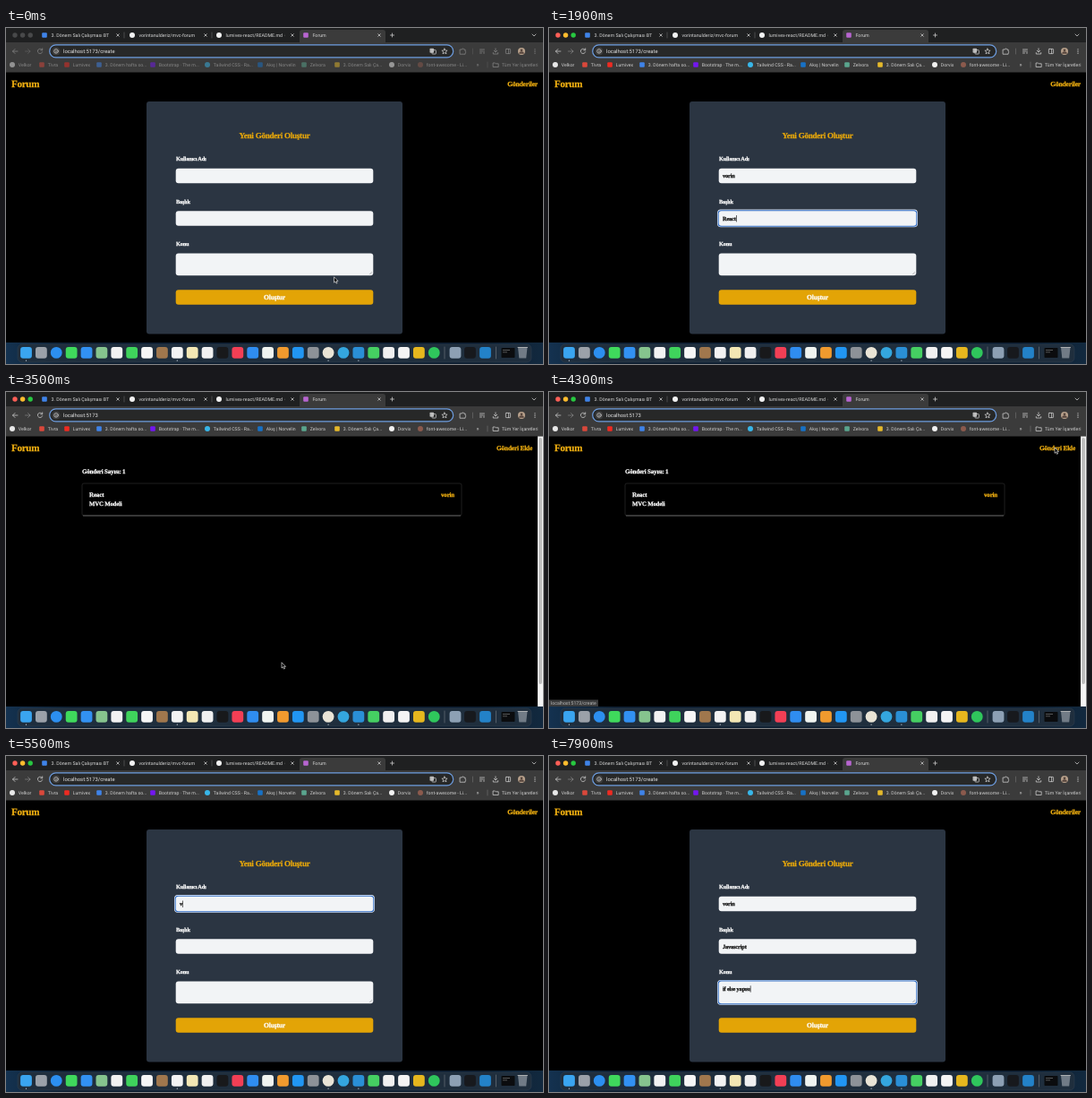
Recreate the animation shown at these times as an HTML page. Size 600 by 375 pixels, loop 8 s.

```html
<!DOCTYPE html>
<html lang="tr">
<head>
<meta charset="utf-8">
<title>Forum</title>
<style>
  html, body { margin: 0; width: 100%; height: 100%; overflow: hidden; background: #000; }
  svg { display: block; width: 100vw; height: 100vh; }
  text { white-space: pre; text-rendering: geometricPrecision; }
  .ui { font-family: Roboto, "Liberation Sans", sans-serif; }
  .page text {
    font-family: "Liberation Serif", "Noto Serif", serif; font-weight: 700; letter-spacing: -.028em;
    fill: currentColor; stroke: currentColor; stroke-width: .25px;
  }
  .line { fill: none; stroke: #c7c7c7; stroke-width: .8; stroke-linecap: round; stroke-linejoin: round; }
  /* window in the background */
  .idle .tools { opacity: .5; }
  .idle .lights circle { fill: #48494a; }
</style>
</head>
<body>
<svg id="stage" viewBox="0 0 600 375">
  <defs>
    <linearGradient id="desk" x2="1">
      <stop stop-color="#143250"/><stop offset=".12" stop-color="#0c1d2f"/>
      <stop offset=".88" stop-color="#0c1d2f"/><stop offset="1" stop-color="#12293f"/>
    </linearGradient>
  </defs>
  <rect width="600" height="375"/>
  <g id="browser" class="ui"></g>

  <g id="create" class="page">
    <text x="6" y="66.3" font-size="11.1" color="#f2b111">Forum</text>
    <text x="594" y="65" font-size="7.6" color="#f2b111" text-anchor="end">Gönderiler</text>
    <rect x="157" y="82" width="286" height="259.5" rx="3" fill="#2b3542"/>
    <text x="300" y="123.3" font-size="9.05" color="#eaa90a" text-anchor="middle">Yeni Gönderi Oluştur</text>
    <g id="form"></g>
    <rect x="189.7" y="292.2" width="220.6" height="16.5" rx="3" fill="#e3a406"/>
    <text x="300" y="303" font-size="7.6" color="#fff" text-anchor="middle">Oluştur</text>
  </g>

  <g id="list" class="page">
    <text x="6" y="66.3" font-size="11.1" color="#f2b111">Forum</text>
    <text x="588" y="65" font-size="7.4" color="#f2b111" text-anchor="end">Gönderi Ekle</text>
    <text x="85" y="91" font-size="7" color="#fff">Gönderi Sayısı: 1</text>
    <rect x="85" y="102" width="424" height="36" rx="2" fill="#000" stroke="#333" stroke-width=".6"/>
    <path d="M86 138H508" stroke="#757575" stroke-width=".8"/>
    <text x="93" y="117" font-size="7.1" color="#fff">React</text>
    <text x="93" y="127" font-size="6.8" color="#fff">MVC Modeli</text>
    <text x="501" y="117" font-size="7" color="#f2b111" text-anchor="end">vorin</text>
    <rect x="594" y="49.5" width="6" height="301.5" fill="#f5f5f5"/>
    <rect x="595.2" y="51" width="3.8" height="275" rx="1.9" fill="#bdbdbd"/>
  </g>

  <g id="status" class="ui">
    <rect id="statusBox" y="343.5" height="7.5" fill="#3a3b3c"/>
    <text id="statusText" x="2" y="349" font-size="5.2" fill="#b9b9b9"></text>
  </g>
  <g id="dock"></g>
  <path id="mouse" d="M0 0V6.3L1.5 5L2.5 7.3L3.6 6.8L2.6 4.6H4.5Z" fill="#000" stroke="#fff" stroke-width=".6"/>
</svg>
<script>
const $ = id => document.getElementById(id);
const label = (x, y, s, size = 5.2, fill = '#cfcfcf') =>
  `<text x="${x}" y="${y}" font-size="${size}" fill="${fill}">${s}</text>`;
const box = (x, y, w, h, r, fill) =>
  `<rect x="${x}" y="${y}" width="${w}" height="${h}" rx="${r}" fill="${fill}"/>`;
const dot = (x, y, r, fill) => `<circle cx="${x}" cy="${y}" r="${r}" fill="${fill}"/>`;
const line = (d, extra = '') => `<path class="line" d="${d}" ${extra}/>`;
const group = (name, s) => `<g class="${name}">${s}</g>`;
const icon = (x, y, fill, round) => round ? dot(x, y, 3, fill) : box(x - 2.8, y - 2.8, 5.6, 5.6, 1, fill);

// Browser window
const tabs = [
  [43, '#3f83e8', 0, '3. Dönem Salı Çalışması BT', 125],
  [141, '#f1f1f1', 1, 'vorintanulderiz/mvc-forum', 223],
  [238, '#f1f1f1', 1, 'lumivex-react/README.md ·', 320],
  [335, '#b765d0', 0, 'Forum', 417]
];
const marks = [
  [7, '#e8e8e8', 1, 'Velkor'], [40, '#d9483b', 0, 'Tivra'], [68, '#ee2b22', 0, 'Lumivex'],
  [104, '#3f83e8', 0, '3. Dönem hafta so...'], [164, '#7317f0', 0, 'Bootstrap · The m...'],
  [225, '#38b6e8', 1, 'Tailwind CSS - Ra...'], [284, '#1771c6', 0, 'Akış | Norvelin'],
  [333, '#5aa58e', 0, 'Zelvora'], [370, '#e5b92b', 0, '3. Dönem Salı Ça...'],
  [431, '#f1f1f1', 1, 'Dorvix'], [463, '#8b5a4d', 1, 'font-awesome - Li...']
];

function tabStrip() {
  let s = box(0, 0, 600, 18, 0, '#1f2021') + box(0, 16, 600, 33.5, 0, '#3b3b3b');
  s += box(328, 2, 96, 18, 3, '#3b3b3b');
  s += group('lights', ['#fe5f57', '#febc2e', '#28c840'].map((c, i) => dot(10 + i * 8.6, 8, 2.7, c)).join(''));
  for (const [x, fill, round, title, close] of tabs) {
    s += icon(x, 8, fill, round) + label(x + 7.5, 9.9, title, 5.3, '#d8d8d8');
    s += line(`M${close - 1.3} 6.7l2.6 2.6m0-2.6l-2.6 2.6`);
  }
  s += line('M132 5v6M230 5v6', 'opacity=".35"');
  return s + line('M429.5 8h4M431.5 6v4M588 7l2 2l2-2');
}

function addressBar() {
  let s = `<rect x="48.7" y="18.9" width="451" height="14" rx="7" fill="#272828" stroke="#6d9de0" stroke-width="1.2"/>`;
  s += dot(56, 25.9, 4.6, '#3b3b3b') + `<circle class="line" cx="56" cy="25.9" r="2.3"/>` + line('M56 25.6V27');
  s += `<text id="url" x="64" y="28" font-size="5.9" fill="#e3e3e3"></text>`;
  s += box(473.5, 22.7, 4.6, 5, .8, '#b9b9b9') + `<rect class="line" x="476" y="24.6" width="4.4" height="4.4" rx=".7"/>`;
  return s + line('M490 23l.9 2 2.2.2-1.7 1.4.6 2.2-2-1.2-2 1.2.6-2.2-1.7-1.4 2.2-.2Z');
}

function tools() {
  let s = line('M13 26H7.5M10 23.5L7.5 26L10 28.5');
  s += line('M21.5 26H27M24.5 23.5L27 26L24.5 28.5', 'opacity=".45"');
  s += line('M40.4 24.4A2.7 2.7 0 1 0 40.7 26.7M40.7 22.8V24.8H38.7');
  s += line('M507.5 24h2a1 1 0 0 1 2 0h1.6v2a1 1 0 0 1 0 1.9v1.3h-5.6Z');
  s += line('M521.5 23v6', 'opacity=".3"');
  s += line('M529.5 24h5M529.5 26h3M529.5 28h2M534 28.5V25.8');
  s += line('M547 22.8v4M545.2 25.2l1.8 1.8 1.8-1.8M544.3 27.5v1.5h5.4v-1.5');
  s += `<rect class="line" x="558.4" y="23.4" width="5.2" height="5.2" rx=".7"/>` + line('M561.6 23.4v5.2');
  for (const y of [23.8, 26, 28.2]) s += dot(591, y, .65, '#c7c7c7');
  for (const [x, fill, round, title] of marks) s += icon(x, 41, fill, round) + label(x + 6.8, 42.8, title);
  s += label(525.5, 43, '»', 6.5) + line('M538 38v6', 'opacity=".3"');
  return s + line('M544.5 39h2l.8.8h2.9v3.7h-5.7Z') + label(554, 42.8, 'Tüm Yer İşaretleri');
}

function drawBrowser() {
  const avatar = dot(576, 26, 4, '#b7a08b') + dot(576, 24.8, 1.4, '#54443c') +
    `<path d="M573.2 28.8a2.8 2.5 0 0 1 5.6 0Z" fill="#54443c"/>`;
  $('browser').innerHTML = tabStrip() + addressBar() + group('tools', tools()) + avatar;
}

// Dock: plain tiles, left to right; "o" marks a round one
const tiles = ('3aa5f0 9ba1a9 2c8ff0o 3fd95c 3291f2 86c48e f2f2f2 3fd35c f6f6f6 a0774d f3f3f3 f3e7b4 f0f0f0 18191b ' +
  'f23f55 2f8df0 f0f4f0 f09a2e 2196f3 8d9298 e9e4d6o 34a6deo 2a8fd6 45cf62 f0f0f0 f4f4f4 e6b71e 2fc65co').split(' ');

function drawDock() {
  const place = i => 22.5 + i * 16.88;
  const tile = (x, c) => box(x - 6.4, 356, 12.8, 12.8, c[6] ? 6.4 : 3, '#' + c.slice(0, 6));
  let s = box(0, 351, 600, 24, 0, 'url(#desk)');
  s += `<rect x="13" y="353" width="574" height="20" rx="5" fill="#1f2e3d" stroke="#3b4a59" stroke-width=".4"/>`;
  tiles.forEach((c, i) => s += tile(place(i), c));
  s += tile(502, '8da0b4') + tile(518.5, '17191d') + tile(535.5, '2382c8');
  s += line('M490 356v13M547.5 356v13', 'opacity=".4"');
  s += box(553.5, 357, 15, 11, .8, '#0b0c0e') + box(555, 359, 8, .7, 0, '#777') + box(555, 361.5, 5, .7, 0, '#777');
  s += `<path d="M572 356.5h10.5l-1.3 12h-7.9Z" fill="#b4bbc2" opacity=".55"/>` + line('M572 356.5h10.5');
  for (const i of [0, 10, 20, 22]) s += dot(place(i), 371.2, .6, '#c9d1d8');
  $('dock').innerHTML = s;
}

// Form fields: label, label baseline, top, height, text baseline
const fields = [
  ['Kullanıcı Adı', 148.3, 156.7, 16.5, 167.2],
  ['Başlık', 196, 204.2, 16.5, 214.7],
  ['Konu', 243, 251.5, 24.7, 262]
];

function drawForm() {
  let s = '';
  fields.forEach(([name, ly, y, h, ty], i) => {
    const grown = (by, fill) => box(189.7 - by, y - by, 220.6 + 2 * by, h + 2 * by, 3 + by / 2, fill);
    s += `<text x="190" y="${ly}" font-size="6.3" color="#fff">${name}</text>`;
    s += `<g id="ring${i}">${grown(1.6, '#eef3fb')}${grown(1, '#2f6cc4')}</g>` + grown(0, '#f2f4f6');
    s += `<text id="value${i}" x="194" y="${ty}" font-size="6.4" color="#111"></text>`;
    s += `<rect id="caret${i}" y="${ty - 5.7}" width=".6" height="7.4"/>`;
  });
  s += line('M406.3 274.7l2.4-2.4M407.8 274.7l.9-.9', 'style="stroke:#777;stroke-width:.4"');
  $('form').innerHTML = s;
}

// Time in ms
const LOOP = 8000, ACTIVE_AT = 400, LIST_AT = 3400, CREATE_AT = 4600;
const focusAt = [[ACTIVE_AT, 0], [1350, 1], [2150, 2], [LIST_AT, -1], [5300, 0], [5880, 1], [6650, 2]];
// field, start, ms per key, text, letters already there
const typing = [
  [0, 500, 100, 'vorig', 0], [0, 1000, 100, 'vori', 4], [0, 1100, 100, 'vorin', 4],
  [1, 1500, 100, 'React', 0], [2, 2300, 100, 'MVC Modeli', 0],
  [0, 5450, 90, 'vorin', 0], [1, 5950, 60, 'Javascript', 0], [2, 6750, 85, 'if else yapısı', 0]
];
const path = [
  [0, 366.5, 277.8], [100, 366.5, 277.8], [400, 290, 164], [3100, 290, 164], [3300, 308, 301.8],
  [3600, 308, 301.8], [4200, 565, 62], [4600, 565, 62], [4800, 523.6, 80.8], [5250, 270, 164], [LOOP, 270, 164]
];

function mouseAt(t) {
  const i = path.findIndex(p => p[0] > t), a = path[i - 1], b = path[i];
  const k = (t - a[0]) / (b[0] - a[0]);
  return [a[1] + (b[1] - a[1]) * k, a[2] + (b[2] - a[2]) * k];
}

function valuesAt(t) {
  const out = ['', '', ''], since = t < CREATE_AT ? 0 : CREATE_AT;
  for (const [f, start, step, text, kept] of typing)
    if (start >= since && t >= start) out[f] = text.slice(0, kept + 1 + Math.floor((t - start) / step));
  return out;
}

const show = (id, on) => $(id).style.display = on ? '' : 'none';

function render(t) {
  const onList = t >= LIST_AT && t < CREATE_AT;
  show('list', onList);
  show('create', !onList);
  $('browser').classList.toggle('idle', t < ACTIVE_AT);
  $('url').textContent = 'localhost:5173' + (onList ? '' : '/create');

  let focus = -1;
  for (const [at, f] of focusAt) if (t >= at) focus = f;
  valuesAt(t).forEach((value, i) => {
    const el = $('value' + i);
    el.textContent = value;
    show('ring' + i, i === focus);
    show('caret' + i, i === focus);
    if (i === focus && !onList) $('caret' + i).setAttribute('x', 194.3 + (value ? el.getComputedTextLength() : 0));
  });

  show('status', t >= 4200 && t < 5000);
  $('statusText').textContent = 'localhost:5173' + (onList ? '/create' : '');
  $('statusBox').setAttribute('width', onList ? 55 : 38.5);

  const [x, y] = mouseAt(t);
  $('mouse').setAttribute('transform', `translate(${x} ${y})`);
  show('mouse', t < 500 || (t >= 3100 && t < 5450));
}

drawBrowser();
drawDock();
drawForm();
const begin = performance.now();
function tick() {
  render((performance.now() - begin) % LOOP);
  requestAnimationFrame(tick);
}
tick();
</script>
</body>
</html>
```
